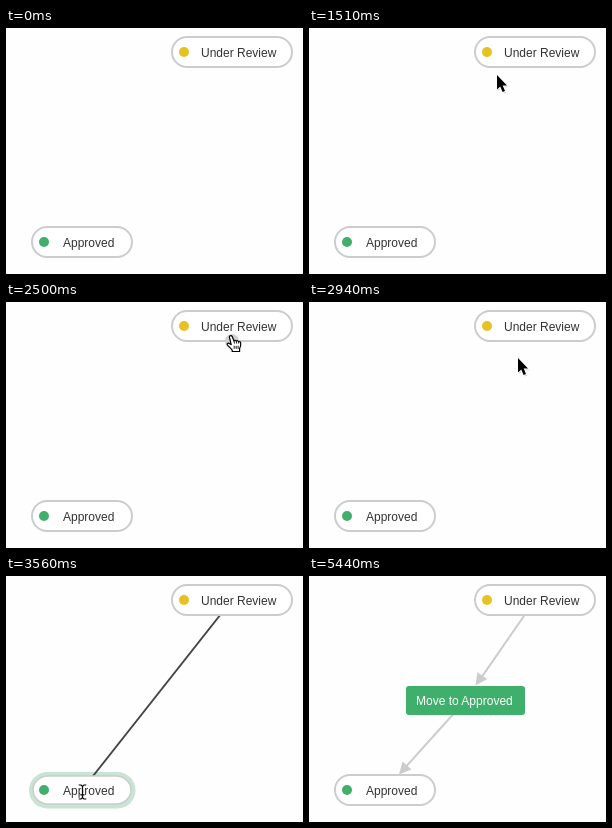
Recreate the animation shown at these times as an HTML page. Size 297x246 px, loop 6.31 s.

```html
<!DOCTYPE html>
<html lang="en">
<head>
<meta charset="utf-8">
<title>Connecting two statuses</title>
<style>
  html, body { margin: 0; width: 100%; height: 100%; overflow: hidden; background: #fefefe; }
  svg { display: block; width: 297px; height: 246px; }
  text { font: 12px "Liberation Sans", Arial, sans-serif; fill: #333; }
  .node { fill: #fff; stroke: #ccc; stroke-width: 2; }
  .edge { stroke: #ccc; stroke-width: 2; }
  .head { fill: #ccc; }
  .outlined { stroke: #fff; paint-order: stroke; }
  [hidden] { display: none; }
</style>
</head>
<body>
<svg viewBox="0 0 297 246">
  <rect id="halo" x="23" y="196" width="106.5" height="36.5" rx="18.2" fill="#c8e4d4"/>
  <path id="drag" stroke="#444" stroke-width="2"/>

  <g id="transition">
    <path class="edge" d="M226 24L173 100.6M156.5 124.5L97 190.7"/>
    <path id="head" class="head" d="M0 0L-12 -6V6Z" transform="translate(166.5 109.5) rotate(124.7)"/>
    <path class="head" d="M0 0L-12 -6V6Z" transform="translate(90 198.4) rotate(132)"/>
    <rect x="97" y="110" width="119" height="29" rx="3" fill="#3fb06c"/>
    <text x="107" y="129" style="fill:#fff">Move to Approved</text>
  </g>

  <rect class="node" x="166" y="9" width="120" height="30" rx="15"/>
  <circle cx="178" cy="24" r="5" fill="#e8c022"/>
  <circle id="port" cx="226" cy="39" r="7" fill="#d0d0d0"/>
  <text x="195" y="29">Under Review</text>

  <rect id="target" class="node" x="26" y="199" width="100" height="30" rx="15"/>
  <circle cx="38" cy="214" r="5" fill="#42ae6c"/>
  <text x="57" y="219">Approved</text>

  <g id="arrow">
    <path d="M1 1.5V16L4.3 13L6.8 18.6L9.3 17.5L6.9 12.2H11.3Z" fill="#000" opacity=".2"/>
    <path class="outlined" stroke-width="2" d="M0 0V14.4L3.2 11.4L5.6 17L8 16L5.7 10.5H10Z"/>
  </g>
  <g id="hand" stroke="#000" stroke-linejoin="round">
    <path fill="#fff" stroke-width="1.2" d="M-1.6 1.6C-1.6 0 .6-.3 1.2 1L3 5.4C3.6 4.4 5 4.6 5.3 5.6C6 4.8 7.3 5.2 7.6 6.2C8.6 5.6 9.6 6.4 9.7 7.6C10 10 9.2 12 8.6 13V16H1.2V14.6C0 13-1.6 11.6-3.4 9.8C-4.6 8.4-3 7-1.6 8L.2 9.2Z"/>
    <path fill="none" stroke-width=".9" d="M3 5.4L3.5 8M5.3 5.6L5.6 8M7.6 6.2V8M3.2 10.3V13.4M5.2 10.3V13.4M7.1 10.3V13.4"/>
  </g>
  <g id="beam" fill="none">
    <path id="beamOutline" stroke="#fff" stroke-width="2.6"/>
    <path id="beamCore" stroke="#000" stroke-width="1.2"/>
  </g>
</svg>
<script>
const LOOP = 6310;
const byId = id => document.getElementById(id);
const show = (id, on) => byId(id).toggleAttribute('hidden', !on);

const beamShape = 'M-3.8-7H-1.4L0-5.6L1.4-7H3.8M0-5.6V5.6M-3.8 7H-1.4L0 5.6L1.4 7H3.8M-2 2.8H2';
byId('beamOutline').setAttribute('d', beamShape);
byId('beamCore').setAttribute('d', beamShape);

// Pointer steps: start time, shape, x, y
const steps = [
  [0, ''],
  [450, 'arrow', 88, -6], [540, 'arrow', 93, 14], [630, 'arrow', 98, 29], [710, 'arrow', 100, 33],
  [1250, 'arrow', 106, 38], [1340, 'arrow', 128, 49], [1430, 'arrow', 159, 52], [1510, 'arrow', 188, 47],
  [1600, 'arrow', 207, 43], [1690, 'arrow', 219, 38], [1780, 'beam', 227, 31], [1870, 'beam', 230, 29.5],
  [1960, 'beam', 223.5, 29.5],
  [2230, 'beam', 224, 31], [2320, 'hand', 224.5, 32.5], [2410, 'hand', 225, 33], [2500, 'hand', 225, 33.5],
  [2590, 'hand', 225.5, 35], [2680, 'hand', 226, 36],
  [2940, 'arrow', 209, 56], [3030, 'arrow', 186, 86], [3120, 'arrow', 157, 122], [3210, 'arrow', 127, 159],
  [3290, 'arrow', 103, 188], [3380, 'beam', 86, 207], [3470, 'beam', 78, 214], [3560, 'beam', 76.5, 216],
  [5350, 'arrow', 87, 218], [5440, '']
];
const dragStart = 3030, snapTime = 3380, dropTime = 4540;

function draw(t) {
  const [, shape, x, y] = steps.findLast(step => step[0] <= t);
  for (const id of ['arrow', 'hand', 'beam']) {
    show(id, id === shape);
    if (id === shape) byId(id).setAttribute('transform', `translate(${x} ${y})`);
  }

  const snapped = t >= snapTime && t < dropTime;
  const dragging = t >= dragStart && t < dropTime;
  show('port', shape === 'hand');
  show('halo', snapped);
  show('drag', dragging);
  show('transition', t >= dropTime);
  if (dragging) byId('drag').setAttribute('d', `M226 24L${snapped ? '76 214' : `${x} ${y}`}`);

  const inset = snapped ? 1 : 0;
  const target = byId('target');
  target.setAttribute('x', 26 + inset);
  target.setAttribute('y', 199 + inset);
  target.setAttribute('width', 100 - 2 * inset);
  target.setAttribute('height', 30 - 2 * inset);
  target.style.strokeWidth = snapped ? 1.5 : 2;
}

const start = performance.now();
function tick() {
  draw((performance.now() - start) % LOOP);
  requestAnimationFrame(tick);
}
tick();
</script>
</body>
</html>
```
